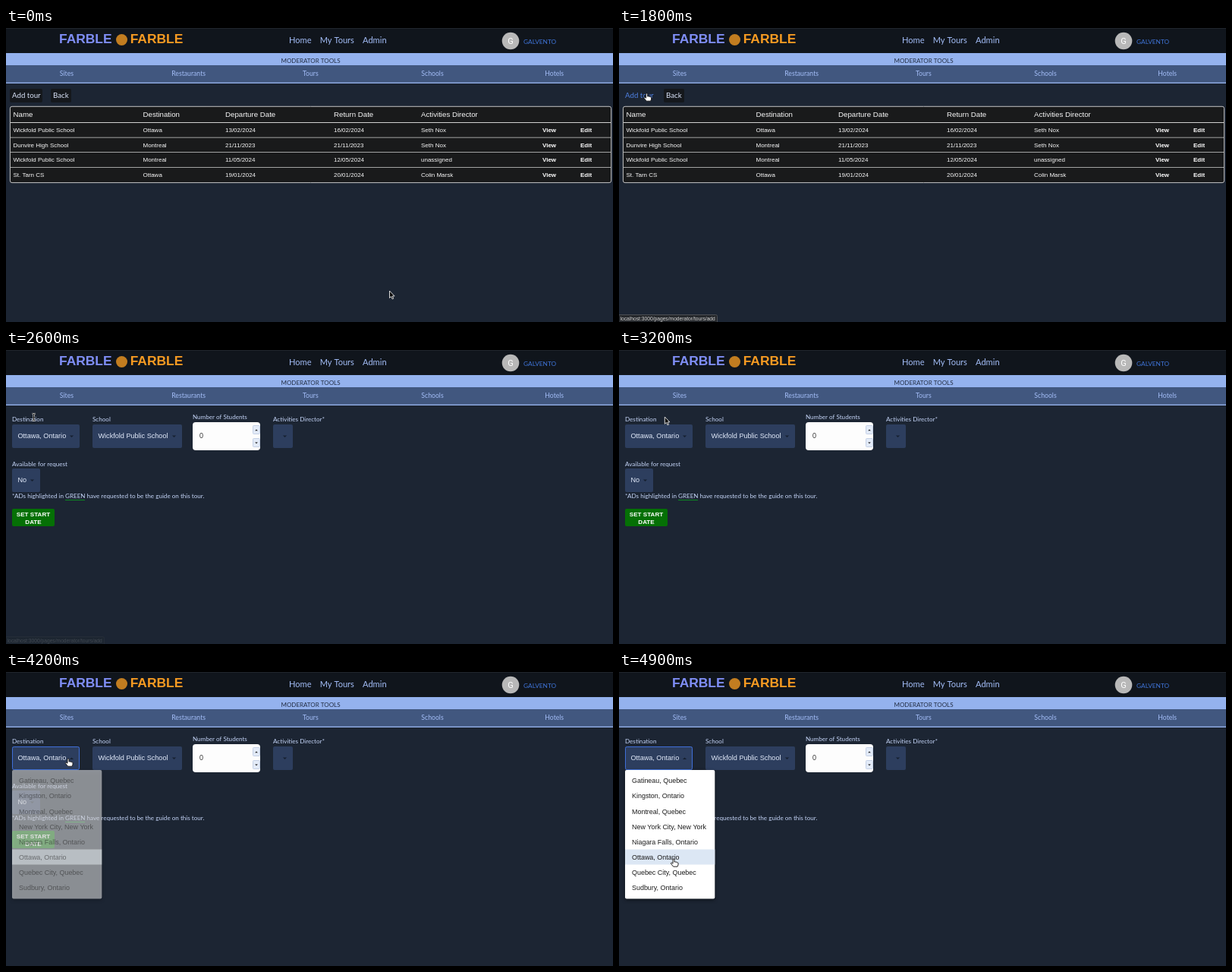
These frames come from a looping animation (800 px wide and 387 px high, 5 s). An HTML page with a canvas:

```html
<!DOCTYPE html>
<html lang="en">
<head>
<meta charset="utf-8">
<title>Moderator tools</title>
<style>
  html, body { margin: 0; width: 100%; height: 100%; overflow: hidden; background: #1c2533; }
  canvas { display: block; width: 800px; height: 387px; }
</style>
</head>
<body>
<canvas id="stage"></canvas>
<script>
const W = 800, H = 387, LOOP = 5000, STEP = 100;
const SANS = '"Liberation Sans", Arial, sans-serif';
const GEO = 'Lato, "Open Sans", sans-serif';
const PALE = '#a3bdf7', BAND = '#94b2ee', SELECT = '#2d3e5e', WHITE = '#fafafa';

const canvas = document.getElementById('stage');
const ctx = canvas.getContext('2d');
const ratio = window.devicePixelRatio || 1;
canvas.width = W * ratio;
canvas.height = H * ratio;
ctx.scale(ratio, ratio);

function rect(x, y, w, h, fill, r = 0, stroke) {
  ctx.beginPath();
  ctx.roundRect(x, y, w, h, r);
  if (fill) { ctx.fillStyle = fill; ctx.fill(); }
  if (stroke) { ctx.strokeStyle = stroke; ctx.lineWidth = 1; ctx.stroke(); }
}

function text(str, x, y, size, color, { font = SANS, weight = 400, align = 'left' } = {}) {
  ctx.font = `${weight} ${size}px ${font}`;
  ctx.textAlign = align;
  ctx.fillStyle = color;
  ctx.fillText(str, x, y);
}

const geo = (str, x, y, size, color, align) => text(str, x, y, size, color, { font: GEO, align });

function disc(x, y, r, fill) {
  ctx.beginPath();
  ctx.arc(x, y, r, 0, Math.PI * 2);
  ctx.fillStyle = fill;
  ctx.fill();
}

function caret(x, y, half, dir, fill) {
  ctx.beginPath();
  ctx.moveTo(x - half, y - half / 2 * dir);
  ctx.lineTo(x + half, y - half / 2 * dir);
  ctx.lineTo(x, y + half / 2 * dir);
  ctx.fillStyle = fill;
  ctx.fill();
}

function header() {
  rect(0, 0, W, H, '#1c2533');
  rect(0, 0, W, 33, '#10151c');
  rect(0, 0, W, 1, '#20252c');
  text('FARBLE', 70, 20, 17.4, '#7f8ef6', { weight: 700 });
  disc(152.5, 15.5, 7.5, '#c27d20');
  text('FARBLE', 163.7, 20, 17.4, '#f59a22', { weight: 700 });
  geo('Home', 373, 20.4, 11.1, PALE);
  geo('My Tours', 413.7, 20.4, 11.1, PALE);
  geo('Admin', 470, 20.4, 11.1, PALE);
  disc(665, 17, 11.3, '#b8b8b8');
  text('G', 665, 20.8, 11, '#fff', { font: 'Roboto, sans-serif', align: 'center' });
  geo('GALVENTO', 682, 21.3, 8.3, '#3f74d8');

  rect(0, 33, W, 16, BAND);
  geo('MODERATOR TOOLS', 401.5, 46.2, 8, '#222d42', 'center');
  rect(0, 49, W, 22.5, '#41577f');
  rect(0, 71.5, W, 1.5, BAND);
  ['Sites', 'Restaurants', 'Tours', 'Schools', 'Hotels'].forEach((s, i) =>
    geo(s, 79.9 + i * 160.7, 62.8, 8.7, PALE, 'center'));
}

const COLS = [9.5, 180.5, 289, 432, 547];
const HEADS = ['Name', 'Destination', 'Departure Date', 'Return Date', 'Activities Director'];
const ROWS = [
  ['Wickfold Public School', 'Ottawa', '13/02/2024', '16/02/2024', 'Seth Nox'],
  ['Dunvire High School', 'Montreal', '21/11/2023', '21/11/2023', 'Seth Nox'],
  ['Wickfold Public School', 'Montreal', '11/05/2024', '12/05/2024', 'unassigned'],
  ['St. Tarn CS', 'Ottawa', '19/01/2024', '20/01/2024', 'Colin Marsk']
];

function listPage(hover) {
  if (!hover) rect(5, 80, 43, 18, '#15181c', 2);
  rect(59, 80, 27, 18, '#15181c', 2);
  geo('Add tour', 8, 92, 9.7, hover ? '#4f80e2' : '#dbe5fb');
  geo('Back', 62, 92, 9.7, '#dbe5fb');

  rect(5.4, 103.3, 792.2, 100.3, '#191a1b', 2.5, '#c4c4c4');
  HEADS.forEach((s, i) => text(s, COLS[i], 116.9, 9.7, WHITE));
  ROWS.forEach((row, n) => {
    const y = 124.5 + n * 19.6;
    rect(6, y - .4, 791, .8, '#d0d0d0');
    const base = y + 12.7;
    row.forEach((s, i) => text(s, COLS[i], base, 8, WHITE));
    text('View', 707, base, 8, '#fff', { weight: 700 });
    text('Edit', 757, base, 8, '#fff', { weight: 700 });
  });
}

function select(label, x, y, w, open) {
  rect(x, y, w, 31, SELECT, 2);
  if (open) rect(x + .5, y + .5, w - 1, 30, null, 2, '#3f6fd8');
  text(label, x + 7.5, y + 18.2, 9.1, '#e3ebfb');
  caret(x + w - 10.5, y + 15.8, 2.6, open ? -1 : 1, '#162030');
}

function formPage(open) {
  const label = (s, x, y) => geo(s, x, y, 8.1, '#c5d5f8');
  label('Destination', 8, 94.3);
  label('School', 114, 94.3);
  label('Number of Students', 246, 91.2);
  label('Activities Director*', 352, 94.3);
  select('Ottawa, Ontario', 8, 98, 89, open);
  select('Wickfold Public School', 114, 98, 118);
  select('', 352, 98, 26);

  rect(246, 95, 89, 37, '#fdfdfd', 4);
  geo('0', 255, 116, 8.6, '#333');
  rect(325.5, 99.5, 9, 11, '#e3ebf8', 1, '#c4d0e6');
  rect(325.5, 116.5, 9, 11, '#e3ebf8', 1, '#c4d0e6');
  caret(330, 105.3, 1.8, -1, '#111');
  caret(330, 122.3, 1.8, 1, '#111');

  label('Available for request', 8, 153.4);
  select('No', 8, 156, 37);
  label('*ADs highlighted in', 8, 195.2);
  label('GREEN', 78, 195.2);
  label('have requested to be the guide on this tour.', 106.5, 195.2);
  rect(78, 197, 26, 1, '#0c8a22');
  rect(8, 209, 56, 23, '#057005', 2);
  text('SET START', 36, 219, 8.1, '#fff', { weight: 700, align: 'center' });
  text('DATE', 36, 229, 8.1, '#fff', { weight: 700, align: 'center' });
}

const CITIES = ['Gatineau, Quebec', 'Kingston, Ontario', 'Montreal, Quebec', 'New York City, New York',
  'Niagara Falls, Ontario', 'Ottawa, Ontario', 'Quebec City, Quebec', 'Sudbury, Ontario'];
const CHOSEN = 5, ITEM = 20.1, MENU_TOP = 133;

function menu(alpha, hovered) {
  ctx.save();
  ctx.globalAlpha = alpha;
  ctx.shadowColor = 'rgba(0,0,0,.45)';
  ctx.shadowBlur = 5;
  ctx.shadowOffsetY = 2;
  rect(8, 129, 118.3, 169.5, '#fff', 2);
  ctx.shadowColor = 'transparent';
  CITIES.forEach((s, i) => {
    const y = MENU_TOP + i * ITEM;
    if (i === CHOSEN) rect(8, y, 118.3, ITEM, i === hovered ? '#dce7f4' : '#e8eff3');
    else if (i === hovered) rect(8, y, 118.3, ITEM, '#f4f4f4');
    text(s, 17, y + 13.3, 8.95, '#1c1c1c');
  });
  ctx.restore();
}

function status(alpha) {
  ctx.save();
  ctx.globalAlpha = alpha;
  rect(-1, 377.5, 130.5, 12, '#25282c', 2, '#4a4d52');
  text('localhost:3000/pages/moderator/tours/add', 1.5, 385, 6.7, '#d5d5d5');
  ctx.restore();
}

// time, x, y of the pointer tip
const PATH = [
  [0, 505.5, 346], [500, 500, 341], [700, 390, 276], [1000, 118, 148], [1300, 38, 87],
  [1700, 36.6, 86], [2900, 36.6, 86], [3500, 84, 90], [4000, 84, 90], [4200, 82, 114],
  [4400, 81, 131.5], [4600, 77, 180], [4900, 72, 246], [5000, 72, 246]
];

function pointer(t) {
  const i = PATH.findIndex(p => p[0] > t);
  const [t0, x0, y0] = PATH[i - 1], [t1, x1, y1] = PATH[i];
  const k = t < 500 ? 0 : (t - t0) / (t1 - t0);
  return [x0 + (x1 - x0) * k, y0 + (y1 - y0) * k];
}

const ARROW = new Path2D('M0 0V9.3L2.2 7.4 3.7 10.8 5.2 10.1 3.8 6.9H6.6Z');
const HAND = new Path2D('M-1 .9C-1-.4 1-.4 1 .9V4.2C1.6 3.4 2.6 3.6 2.8 4.4 3.5 3.8 4.4 4 4.5 4.9 5.2 4.5 6 4.9 6 5.8V8L5 10.2H-.4L-3.6 6.2C-4 5.2-2.7 4.6-1 6.2Z');
const BEAM = new Path2D('M-2-2.2Q0-2.2 0-1.2 0-2.2 2-2.2M0-1.2V5.8M-2 6.8Q0 6.8 0 5.8 0 6.8 2 6.8M-1.2 2.8H1.2');

function drawPointer(kind, x, y) {
  ctx.save();
  ctx.translate(x, y);
  ctx.lineJoin = 'round';
  if (kind === 'beam') {
    ctx.strokeStyle = '#eee';
    ctx.lineWidth = 2.2;
    ctx.stroke(BEAM);
    ctx.strokeStyle = '#111';
    ctx.lineWidth = 1;
    ctx.stroke(BEAM);
  } else {
    const hand = kind === 'hand';
    ctx.fillStyle = hand ? '#fff' : '#0c0c0c';
    ctx.strokeStyle = hand ? '#111' : '#eee';
    ctx.lineWidth = .9;
    const shape = hand ? HAND : ARROW;
    ctx.fill(shape);
    ctx.stroke(shape);
  }
  ctx.restore();
}

function pointerKind(t) {
  if (t >= 1700 && t < 2400) return 'hand';
  if (t >= 2400 && t < 3100) return 'beam';
  if (t === 4200 || t >= 4500) return 'hand';
  return 'arrow';
}

function draw(time) {
  const t = Math.floor((time % LOOP) / STEP) * STEP;
  const [x, y] = pointer(t);
  const open = t >= 4200;
  header();
  if (t < 2600) listPage(t >= 1700);
  else formPage(open);
  if (t >= 1700 && t < 2600) status(1);
  else if (t === 2600) status(.2);
  if (open) menu(t === 4200 ? .5 : 1, t >= 4500 ? Math.floor((y - MENU_TOP) / ITEM) : -1);
  drawPointer(pointerKind(t), x, y);
}

const start = performance.now();
function tick() {
  draw(performance.now() - start);
  requestAnimationFrame(tick);
}
tick();
</script>
</body>
</html>
```
